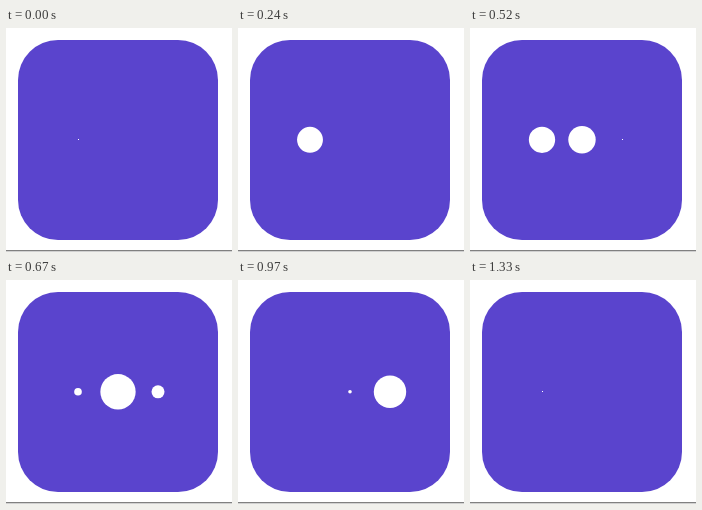
An HTML page with a canvas that plays this animation: 226x224 px, repeating every 1.36 s.

```html
<!DOCTYPE html>
<html lang="en">
<head>
<meta charset="utf-8">
<title>Loading dots</title>
<style>
  html, body { margin: 0; width: 100%; height: 100%; overflow: hidden; background: #fff; }
  canvas { display: block; }
</style>
</head>
<body>
<canvas id="stage" width="226" height="224"></canvas>
<script>
const ctx = document.getElementById('stage').getContext('2d');
const LOOP = 1360, STEPS = 45, RISE = 12.3, FALL = 13.8, SIZE = 36;
const dots = [{ x: 72, start: 0 }, { x: 112, start: 8.6 }, { x: 152, start: 17 }];

const smooth = p => p * p * (3 - 2 * p);

// One step lasts 30 ms, except step 12, which lasts 40 ms.
const stepAt = ms => Math.floor((ms < 385 ? ms : ms - 10) / 30);

function scaleAt(age) {
  return age < RISE ? smooth(age / RISE) : 1 - smooth((age - RISE) / FALL);
}

function drawDot(x, age) {
  if (age < 0 || age >= RISE + FALL) return;
  const size = SIZE * scaleAt(age);
  if (size < 1) {
    if (age < RISE) ctx.fillRect(x, 111, 1, 1);
    return;
  }
  ctx.beginPath();
  ctx.arc(x, 111.8, size / 2, 0, Math.PI * 2);
  ctx.fill();
}

function draw(now) {
  const step = stepAt(now % LOOP) % (STEPS - 1); // the last step repeats the first
  ctx.fillStyle = '#fff';
  ctx.fillRect(0, 0, 226, 224);
  ctx.fillStyle = '#808080';
  ctx.fillRect(0, 222, 226, 1);
  ctx.fillStyle = '#d0d0d0';
  ctx.fillRect(0, 223, 226, 1);
  ctx.fillStyle = '#5a44cd';
  ctx.beginPath();
  ctx.roundRect(12, 12, 200, 200, 40);
  ctx.fill();
  ctx.fillStyle = '#fff';
  for (const { x, start } of dots) drawDot(x, step - start);
}

const origin = performance.now();
function tick() {
  draw(performance.now() - origin);
  requestAnimationFrame(tick);
}
tick();
</script>
</body>
</html>
```
